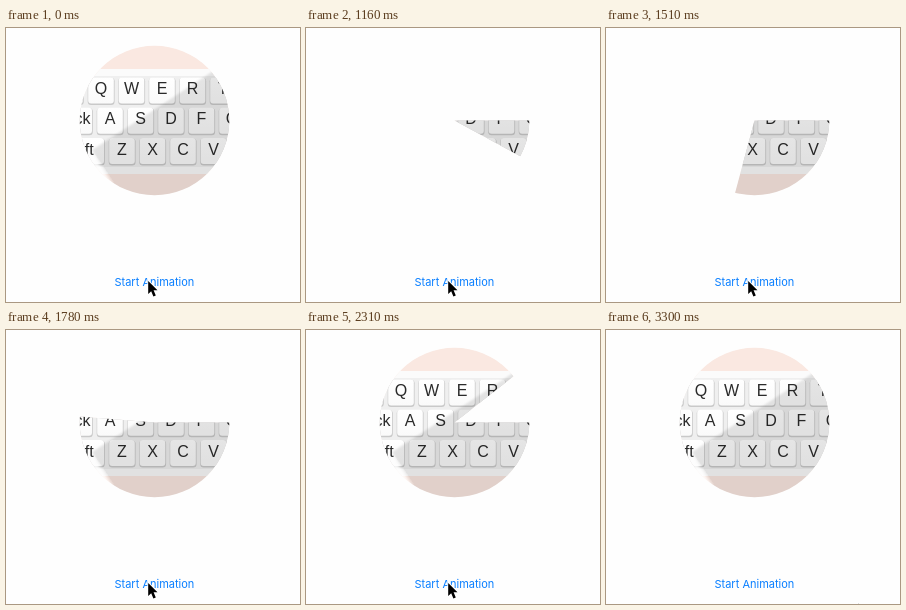
An HTML page that plays this animation: 294 px wide and 274 px high, repeating every 3650 ms.

```html
<!DOCTYPE html>
<html lang="en">
<head>
<meta charset="utf-8">
<title>Radial reveal</title>
<style>
  html, body { margin: 0; width: 100%; height: 100%; overflow: hidden; background: #fefefe; }
  svg { display: block; }
  #keys text { font: 16px "Liberation Sans", Arial, sans-serif; fill: #2a2a2a; text-anchor: middle; }
  #button { font: 11px Inter, Roboto, sans-serif; fill: #0a7fff; text-anchor: middle; }
</style>
</head>
<body>
<svg width="294" height="274" viewBox="0 0 294 274">
  <defs>
    <clipPath id="disc"><circle cx="148.5" cy="92.5" r="74.8"/></clipPath>
    <clipPath id="wedge"><path id="sweep"/></clipPath>
    <filter id="soft"><feGaussianBlur stdDeviation="1"/></filter>
    <linearGradient id="cap" x2="0" y2="1">
      <stop stop-color="#fff"/><stop offset="1" stop-color="#fafafa"/>
    </linearGradient>
  </defs>
  <g clip-path="url(#wedge)">
    <g clip-path="url(#disc)">
      <path fill="#fae8e1" d="M73 17h152v152h-152z"/>
      <path fill="#fbfbfb" d="M73 41h152v105h-152z"/>
      <path fill="#efefef" d="M73 48h152v91h-152z"/>
      <g id="keys"></g>
      <g filter="url(#soft)">
        <path fill="#fefefe" fill-opacity=".8" d="M70 129L87 128L106 156L70 156z"/>
        <path fill-opacity=".1" d="M230 28L134 91L86 122L106 156L120 175H230z"/>
      </g>
    </g>
  </g>
  <text id="button" x="148.4" y="258">Start Animation</text>
  <path id="cursor" stroke="#fff" stroke-width="1.8" paint-order="stroke"
        d="M0 0V13L3 10.2L5.2 15.5L7.6 14.5L5.4 9.3H9.3Z"/>
</svg>
<script>
const $ = id => document.getElementById(id);
const LOOP = 3650, STEP = 88.7, BEGIN = 810;
const CX = 148.5, CY = 92.5, R = 90, PITCH = 30.5;

// Each row: key top, first letter centre, letters, label on the wide key to the left and its centre
const rows = [
  [49.5, 95, 'QWERT', '', 60],
  [79.7, 104, 'ASDFG', 'ck', 76.5],
  [110, 116, 'ZXCV', 'ft', 83.2]
];
const key = (x, y, w) =>
  `<rect x="${x - .5}" y="${y + .2}" width="${w + 1.3}" height="27.4" rx="3.5" fill="#c9c9c9"/>` +
  `<rect x="${x}" y="${y}" width="${w}" height="26" rx="3" fill="url(#cap)"/>`;
const label = (x, y, s) => `<text x="${x}" y="${y + 16.6}">${s}</text>`;

$('keys').innerHTML = rows.map(([y, x, letters, side, sideX]) =>
  key(x - 73, y, 55) + label(sideX, y, side) +
  [...letters].map((c, i) => {
    const cx = x + i * PITCH;
    return key(cx - 12.8, y, 25.6) + label(cx, y, c);
  }).join('')
).join('');

// Ease-in-out, cubic-bezier(.42, 0, .58, 1)
function ease(x) {
  if (x <= 0 || x >= 1) return x <= 0 ? 0 : 1;
  let lo = 0, hi = 1, s;
  for (let i = 0; i < 24; i++) {
    s = (lo + hi) / 2;
    const r = 1 - s;
    if (1.26 * s * r * r + 1.74 * s * s * r + s * s * s < x) lo = s; else hi = s;
  }
  return s * s * (3 - 2 * s);
}

function wedge(part) {
  if (part >= 1) return 'M0 0H294V274H0Z';
  const a = part * 2 * Math.PI;
  return `M${CX} ${CY}h${R}A${R} ${R} 0 ${+(part > .5)} 1 ` +
    `${CX + R * Math.cos(a)} ${CY + R * Math.sin(a)}Z`;
}

function cursorAt(t) {
  if (t < 3120) return [142.2, 253];
  if (t < 3210) return [160, 256];
  return t < 3300 ? [214, 266] : [252, 273.5];
}

function draw() {
  const t = performance.now() % LOOP;
  const tick = Math.floor((t - BEGIN) / STEP + .12);
  const now = BEGIN + tick * STEP;
  $('sweep').setAttribute('d', wedge(t < BEGIN ? 1 : ease((now - 771) / 2000)));
  $('button').setAttribute('opacity', t < BEGIN ? 1 : Math.min(1, .27 + (now - BEGIN) / 410));
  $('cursor').setAttribute('transform', `translate(${cursorAt(t)})`);
  requestAnimationFrame(draw);
}
draw();
</script>
</body>
</html>
```
